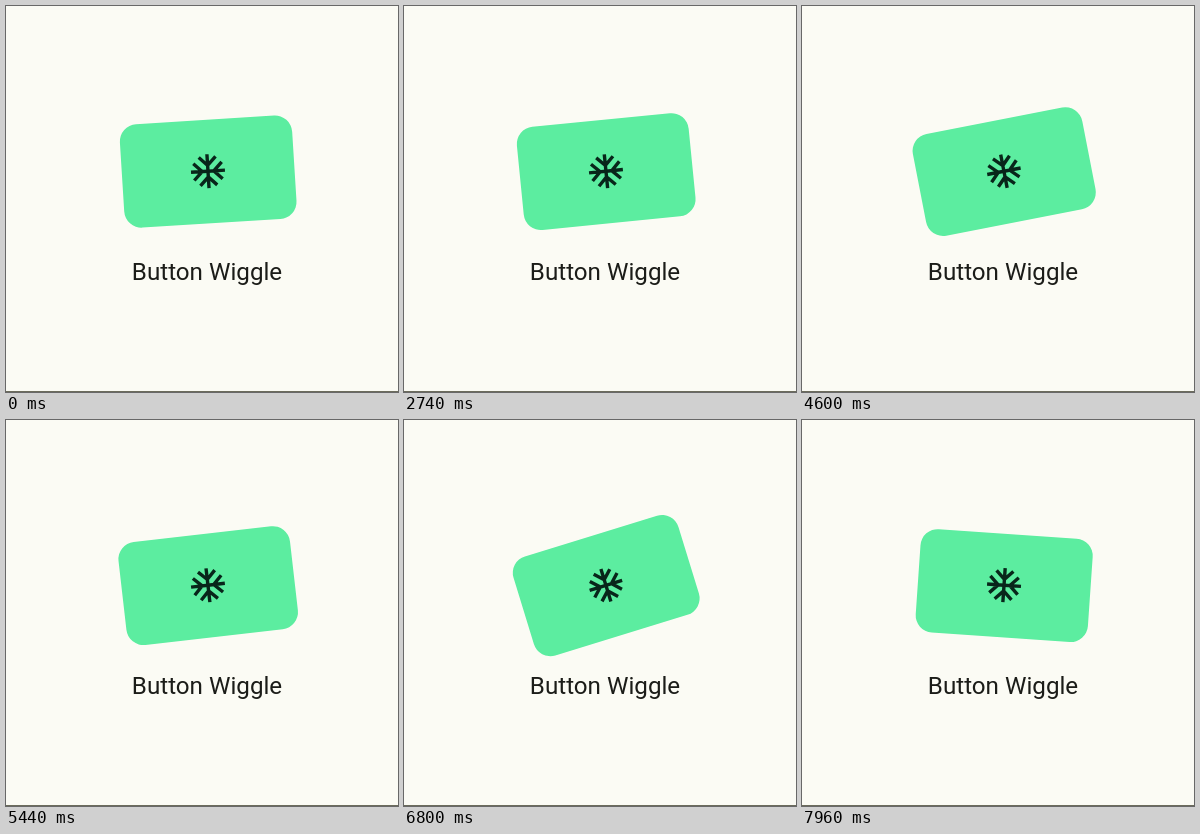
Animation of 392x386 px, one loop 8000 ms. Source, as an HTML page:

```html
<!DOCTYPE html>
<html lang="en">
<head>
<meta charset="utf-8">
<title>Button Wiggle</title>
<style>
  html, body { margin: 0; width: 100%; height: 100%; overflow: hidden; background: #fbfbf4; }
  svg { display: block; width: 392px; height: 386px; }
  text { font: 24.2px Roboto, sans-serif; text-anchor: middle; fill: #1b1c18; }
  .flake { fill: none; stroke: #08261a; stroke-width: 2; }
</style>
</head>
<body>
<svg viewBox="0 0 392 386">
  <defs>
    <path id="arm" d="M0 0H10M8.365 -4.95L3.415 0L8.365 4.95"/>
  </defs>
  <rect y="385" width="392" height="1" fill="#6c6c5c"/>
  <g id="button">
    <rect x="-86.3" y="-51.8" width="172.6" height="103.6" rx="17.2" fill="#5ceda0"/>
    <g class="flake" transform="translate(-.2 -.4) scale(1.7)">
      <use href="#arm"/>
      <use href="#arm" transform="rotate(90)"/>
      <use href="#arm" transform="rotate(180)"/>
      <use href="#arm" transform="rotate(270)"/>
    </g>
  </g>
  <text x="201" y="274">Button Wiggle</text>
</svg>
<script>
  const LOOP = 8000;
  const TILT = -10.6;    // resting angle while pressed, in degrees
  const STIFF = 0.385;   // natural frequency, radians per step
  const DAMPING = 0.17;  // damping ratio

  // The button starts pressed; each toggle releases or presses it.
  const toggles = [-34.5, 35.95, 95.5, 118.5, 146.5];

  // Steps come in threes: two short ones, then a long hold.
  function stepAt(t) {
    if (t < 20) return -18;
    if (t < 120) return -17;
    const beat = t - 80;
    return 3 * Math.floor(beat / 140) + Math.min(2, Math.floor(beat % 140 / 20)) - 18;
  }

  // Progress of an underdamped spring from 0 towards 1.
  function spring(age) {
    if (age <= 0) return 0;
    const decay = DAMPING * STIFF;
    const swing = STIFF * Math.sqrt(1 - DAMPING ** 2);
    const phase = swing * age;
    return 1 - Math.exp(-decay * age) * (Math.cos(phase) + decay / swing * Math.sin(phase));
  }

  function angleAt(step) {
    return TILT * toggles.reduce((sum, at, i) =>
      sum + (i % 2 ? 1 : -1) * spring(step - at), 1);
  }

  const button = document.getElementById('button');
  const start = performance.now();

  function draw(now) {
    const t = Math.max(0, now - start) % LOOP;
    const angle = angleAt(stepAt(t)).toFixed(2);
    button.setAttribute('transform', `translate(202.2 165.6) rotate(${angle})`);
    requestAnimationFrame(draw);
  }
  draw(start);
</script>
</body>
</html>
```
